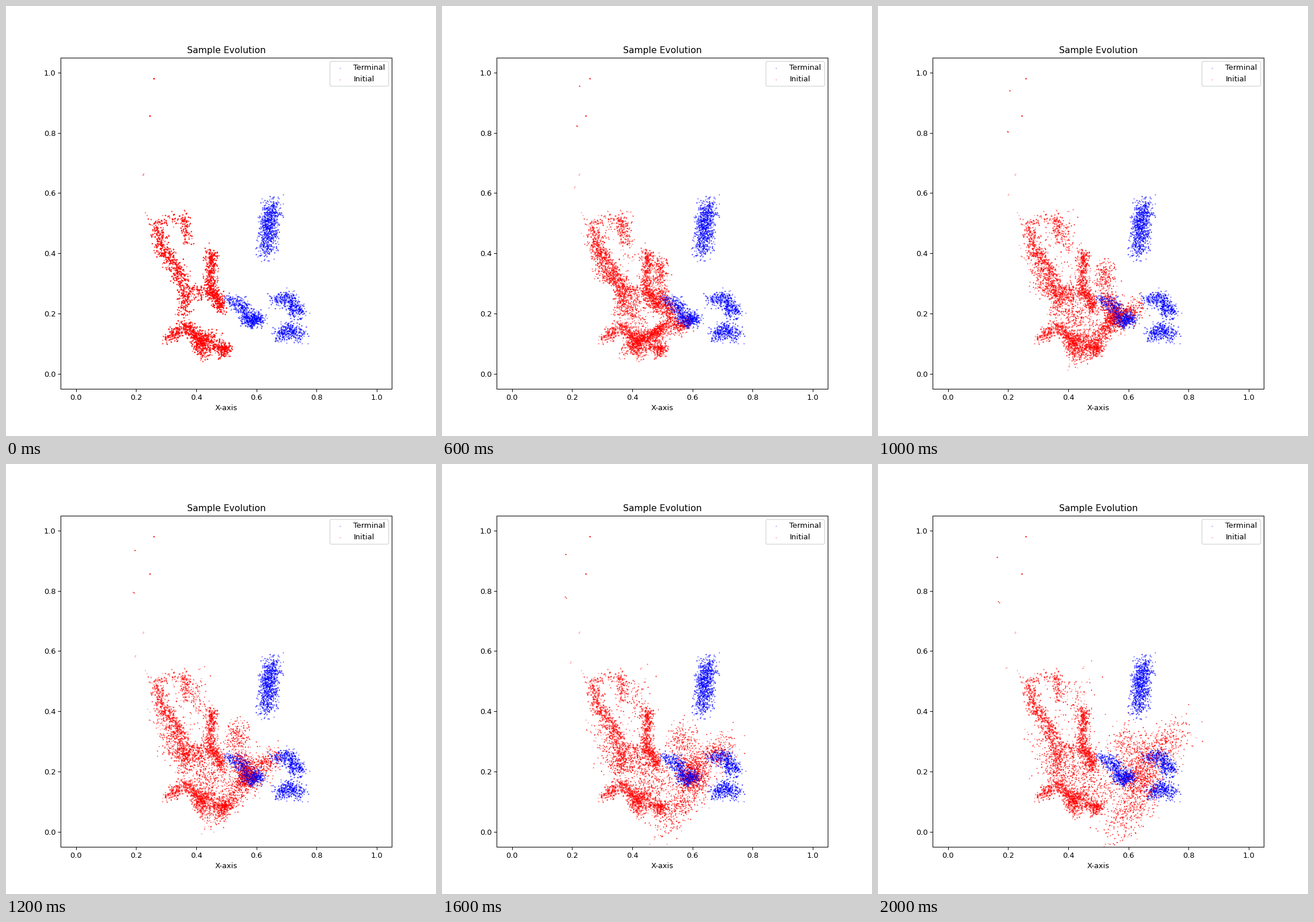
A matplotlib script that plays this animation: 748 by 748 pixels, repeating every 2100 ms.

```python
import numpy as np
import matplotlib.pyplot as plt
from matplotlib.animation import FuncAnimation

FRAMES, INTERVAL = 21, 100
rng = np.random.default_rng(7)

# Drift at a few key places: x, y, dx, dy; the first four are lone outliers
FLOW = np.array([
    (.259, .981, -.097, -.071), (.245, .857, -.078, -.094),
    (.229, .663, -.030, -.120), (.228, .528, .027, -.194),
    (.285, .450, .070, -.200), (.370, .530, .075, -.030),
    (.360, .290, .110, -.125), (.450, .380, .150, -.080),
    (.460, .260, .180, -.090), (.322, .137, .243, -.130),
    (.365, .155, .235, -.070), (.425, .090, .245, .140),
    (.493, .083, .252, .242),
])


def stroke(n, spread, *knots):
    """Points scattered along a polyline."""
    u, at = rng.random(n), np.linspace(0, 1, len(knots))
    line = np.column_stack([np.interp(u, at, c) for c in zip(*knots)])
    return line + np.clip(rng.normal(0, spread, (n, 2)), -2.3 * spread, 2.3 * spread)


def copies(n, most):
    return rng.integers(1, most + 1, n)


def drift(pts):
    """Blend of the key drifts, weighted by closeness."""
    d2 = ((pts[:, None] - FLOW[:, :2]) ** 2).sum(-1)
    w = np.exp((d2.min(1, keepdims=True) - d2) / (2 * .035 ** 2))
    return w @ FLOW[:, 2:] / w.sum(1, keepdims=True)


blue = np.vstack([
    stroke(740, .0155, (.658, .565), (.642, .51), (.640, .47), (.632, .395)),
    stroke(640, .0125, (.505, .243), (.555, .225), (.570, .175), (.612, .185), (.570, .175)),
    stroke(420, .0130, (.660, .245), (.708, .255), (.718, .215), (.750, .205)),
    stroke(340, .0130, (.672, .125), (.705, .150), (.750, .130)),
])
blue = np.repeat(blue, copies(len(blue), 2), axis=0)

cloud = np.vstack([
    stroke(110, .010, (.360, .525), (.362, .490), (.370, .430)),
    stroke(35, .011, (.265, .510), (.345, .515)),
    stroke(610, .013, (.267, .500), (.285, .415), (.325, .365), (.355, .310), (.360, .200)),
    stroke(120, .013, (.360, .265), (.435, .280)),
    stroke(600, .011, (.450, .410), (.446, .290), (.483, .220)),
    stroke(560, .0125, (.305, .120), (.365, .158), (.405, .120), (.425, .060)),
    stroke(260, .015, (.410, .110), (.445, .120), (.480, .070)),
    stroke(140, .011, (.493, .083)),
])
lone = np.repeat(FLOW[:4, :2], 2, axis=0)
lone += rng.normal(size=lone.shape) * np.repeat([[.0006], [.006]], 4, axis=0)

start = np.vstack([cloud, lone])
count = np.r_[copies(len(cloud), 4), [3] * 4, [1] * 4]
shift = drift(start)
noise = rng.normal(0, .03, start.shape)
noise[len(cloud):] *= .05
start, shift, noise = (np.repeat(a, count, axis=0) for a in (start, shift, noise))
bend = np.column_stack([.08 * (start[:, 1] - 1), 0 * start[:, 1]])


def positions(t):
    ease = t * (1.25 - .25 * t)
    return start + shift * ease + bend * t * (1 - t) + noise * t ** 1.2


fig, ax = plt.subplots(figsize=(8, 8), dpi=93.5)
ax.set(xlim=(-.05, 1.05), ylim=(-.05, 1.05), aspect="equal",
       title="Sample Evolution", xlabel="X-axis")


def halo(pts, color, label):
    ax.scatter(*pts.T, s=1, c=color, alpha=.2, label=label)


def cores(pts, color, alpha):
    return ax.scatter(*pts.T, s=1.7, c=color, alpha=alpha, linewidths=0)


halo(blue, "blue", "Terminal")
halo(start, "red", "Initial")
moving = cores(start, "red", .5)
cores(blue, "blue", .35)
ax.legend(loc="upper right")


def update(i):
    moving.set_offsets(positions(i / (FRAMES - 1)))
    return moving,


anim = FuncAnimation(fig, update, frames=FRAMES, interval=INTERVAL,
                     repeat=True, repeat_delay=0)
plt.show()
```
